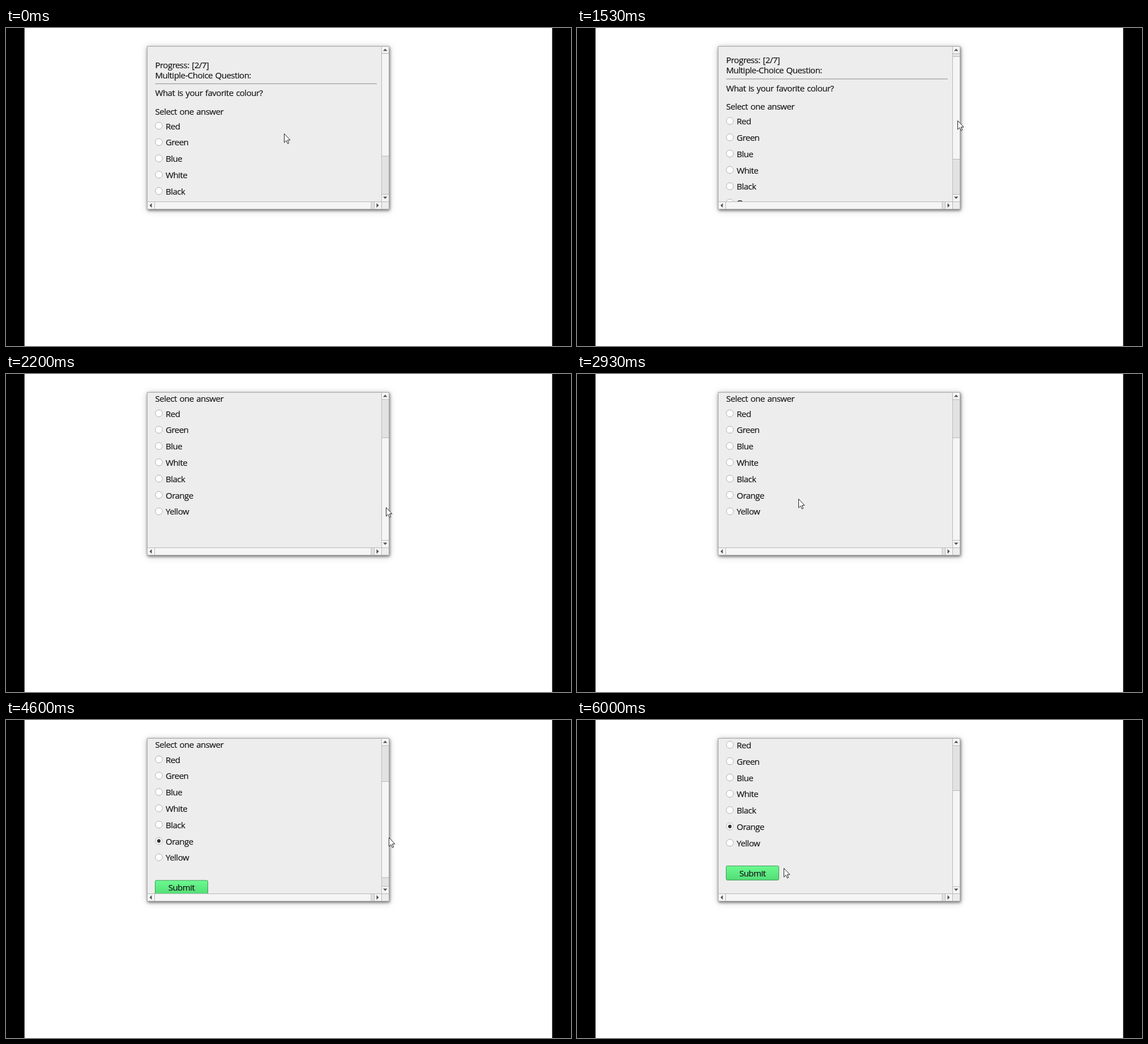
Animation of 998 by 561 pixels, one loop 6.94 s. Source, as an HTML page:

```html
<!DOCTYPE html>
<html lang="en">
<head>
<meta charset="utf-8">
<title>Question dialog</title>
<style>
  html, body { margin: 0; width: 100%; height: 100%; overflow: hidden; background: #fff; }
  svg { display: block; width: 998px; height: 561px; }
  text {
    font: 15px "Open Sans", "Noto Sans", sans-serif;
    letter-spacing: -.5px; word-spacing: 1.2px;
    fill: #161616; stroke: #161616; stroke-width: .2px;
  }
  .window {
    fill: #ededed;
    filter: drop-shadow(1px 2px 2.5px rgba(0, 0, 0, .5)) drop-shadow(0 1px 6px rgba(0, 0, 0, .2));
  }
  .track { fill: #e2e2e2; stroke: #bcbcbc; }
  .thumb { fill: #f5f5f5; stroke: #b8b8b8; }
  .arrow { fill: #505050; }
  .radio { fill: #fff; stroke: #b0b0b0; }
</style>
</head>
<body>
<svg viewBox="0 0 998 561">
  <defs>
    <clipPath id="view"><rect x="249" y="32" width="414" height="274"/></clipPath>
    <linearGradient id="green" x2="0" y2="1">
      <stop offset="0" stop-color="#6cfa90"/>
      <stop offset="1" stop-color="#53dc76"/>
    </linearGradient>
  </defs>
  <rect width="998" height="561" fill="#fff"/>
  <rect width="32.7" height="561"/>
  <rect x="964.7" width="34" height="561"/>
  <rect class="window" x="249" y="32" width="428" height="288"/>

  <g clip-path="url(#view)">
    <g id="content">
      <text x="263.5" y="70.7">Progress: [2/7]</text>
      <text x="263.5" y="88.5">Multiple-Choice Question:</text>
      <path d="M263.5 98.3H655" stroke="#8a8d8a"/>
      <text x="263.5" y="120">What is your favorite colour?</text>
      <text x="263.5" y="152.5">Select one answer</text>
      <g id="answers"></g>
      <circle id="dot" cx="270" cy="316.4" r="3.1" fill="#303030"/>
      <g id="submit">
        <rect x="263.5" y="386" width="93" height="25" rx="2" fill="url(#green)" stroke="#3c9a52"/>
        <text x="310" y="404.5" text-anchor="middle">Submit</text>
      </g>
    </g>
  </g>

  <rect class="track" x="663.5" y="32.5" width="13" height="274"/>
  <rect class="thumb" x="663.5" y="32.5" width="13" height="12.5"/>
  <rect class="thumb" x="663.5" y="293.5" width="13" height="13"/>
  <rect class="thumb" id="thumb" x="663.5" width="13"/>
  <rect class="track" x="249.5" y="306.5" width="414" height="13"/>
  <rect class="thumb" x="249.5" y="306.5" width="13" height="13"/>
  <rect class="thumb" x="262.5" y="306.5" width="382.5" height="13"/>
  <rect class="thumb" x="650.5" y="306.5" width="13" height="13"/>
  <path class="arrow" d="M666 40.5h7.5l-3.75-4zM666 297.5h7.5l-3.75 4zM257.5 309v8l-4-4zM654.5 309v8l4-4z"/>
  <rect x="249.5" y="32.5" width="427" height="287" fill="none" stroke="#aaa"/>

  <path id="cursor" d="M.5.5V16L4 12.7 6.5 18 8.7 17 6.3 11.8H11Z" fill="#fff" stroke="#222" stroke-linejoin="round"/>
</svg>
<script>
const LOOP = 6940, FPS = 15;
const $ = id => document.getElementById(id);
const clamp = (v, lo, hi) => Math.min(hi, Math.max(lo, v));
const linear = k => k;
const smooth = k => k * k * (3 - 2 * k);

// Each move carries the pointer on from where the last one left it
const home = { x: 491, y: 186 };
const moves = [
  { from: 0, to: 2, x: 498, y: 159 },
  { from: 5, to: 11, x: 668, y: 154 },
  { from: 12, to: 13, x: 672, y: 154 },
  { from: 22, to: 27, x: 673, y: 199, ease: linear },
  { from: 27, to: 33, x: 671, y: 235, ease: linear },
  { from: 37, to: 48, x: 271, y: 213 },
  { from: 59, to: 68, x: 678, y: 202, dip: 74 },
  { from: 68, to: 71, x: 669, y: 221 },
  { from: 72, to: 75, x: 668, y: 233, ease: linear },
  { from: 75, to: 78, x: 669, y: 240, ease: linear },
  { from: 81, to: 88, x: 352, y: 263 },
  { from: 88, to: 90, x: 365, y: 261 }
];

function pointer(step) {
  let { x, y } = home;
  for (const move of moves) {
    const { from, to, dip = 0, ease = smooth } = move;
    const k = ease(clamp((step - from) / (to - from), 0, 1));
    x += (move.x - x) * k;
    y += (move.y - y) * k + dip * Math.sin(Math.PI * k);
  }
  return { x, y };
}

// Distance the thumb has been dragged, from the pointer's height while held
function drag(step, from, to, grabY, max) {
  return step < from ? 0 : clamp(pointer(Math.min(step, to)).y - grabY, 0, max);
}

["Red", "Green", "Blue", "White", "Black", "Orange", "Yellow"].forEach((name, i) => {
  const y = 172.4 + i * 28.8;
  $("answers").insertAdjacentHTML("beforeend",
    `<circle class="radio" cx="270" cy="${y}" r="6.2"/><text x="282" y="${y + 6.2}">${name}</text>`);
});

function draw(time) {
  const step = Math.floor((time % LOOP + 5) * FPS / 1000);
  const { x, y } = pointer(step);
  const chosen = step >= 53, answered = step >= 54;
  const first = drag(step, 23, 33, 157.5, 67.5);
  const second = drag(step, 73, 78, 223, 16);
  const scroll = first * 1.526 + second * 1.6;

  $("content").setAttribute("transform", `translate(0 ${-scroll})`);
  $("thumb").setAttribute("y", answered ? 108.5 + second : 45 + first);
  $("thumb").setAttribute("height", answered ? 169.5 : 181);
  $("dot").style.display = chosen ? "" : "none";
  $("submit").style.display = answered ? "" : "none";
  $("cursor").setAttribute("transform", `translate(${Math.round(x)} ${Math.round(y)})`);
}

const start = performance.now();
function tick() {
  draw(performance.now() - start);
  requestAnimationFrame(tick);
}
tick();
</script>
</body>
</html>
```
